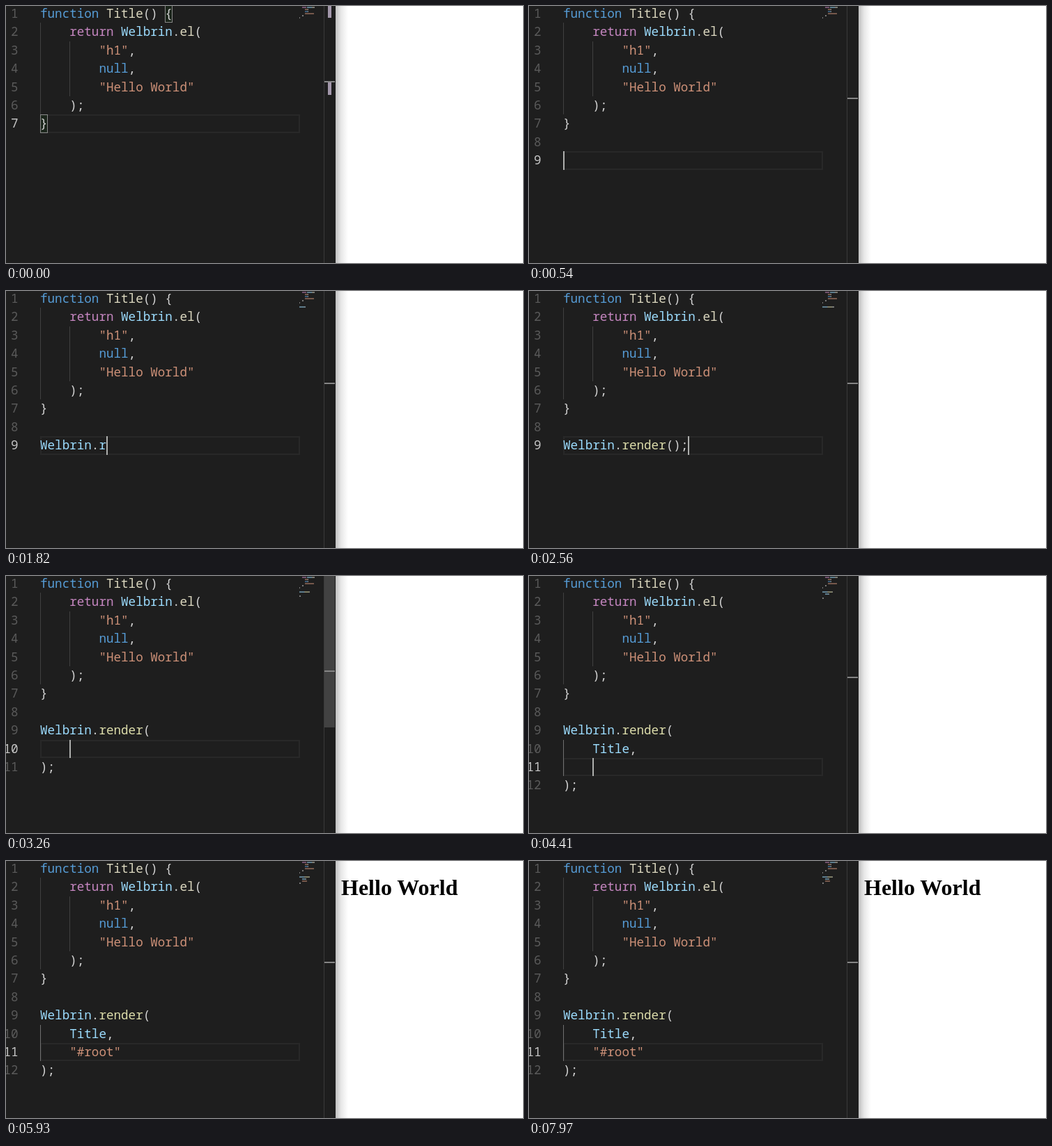
Write an HTML page that moves like this. It is 742x370 px and loops after 8 s.

```html
<!DOCTYPE html>
<html lang="en">
<head>
<meta charset="utf-8">
<title>Code typing</title>
<style>
html, body { margin: 0; width: 100%; height: 100%; overflow: hidden; background: #fff; }
svg { display: block; }
.code { font: 17.58px "Noto Sans Mono", "DejaVu Sans Mono", monospace; }
.page { font: bold 32px "Liberation Serif", "Times New Roman", serif; }
</style>
</head>
<body>
<svg width="742" height="370" viewBox="0 0 742 370">
  <defs>
    <linearGradient id="shade">
      <stop offset="0" stop-opacity=".25"/>
      <stop offset=".45" stop-opacity=".09"/>
      <stop offset="1" stop-opacity="0"/>
    </linearGradient>
  </defs>
  <rect x="473" width="18" height="370" fill="url(#shade)"/>
  <rect width="473" height="370" fill="#1e1e1e"/>
  <g id="editor" class="code"></g>
  <text id="heading" class="page" x="481" y="49">Hello World</text>
</svg>
<script>
const LOOP = 8000, LEFT = 49, CHAR = 10.55, LINE = 26.4, VIEW = 372;
const NAME = 'Welbrin';
const BASE = `function Title() {
    return ${NAME}.el(
        "h1",
        null,
        "Hello World"
    );
}`;
const editorEl = document.getElementById('editor');
const headingEl = document.getElementById('heading');

// Each step is [start time, text after BASE], with | as the caret
const steps = [[0, '|'], [420, '\n|'], [500, '\n\n|']];
function type(head, word, tail, times) {
  times.forEach((t, i) => steps.push([t, head + word.slice(0, i + 1) + '|' + tail]));
}
const call = `\n\n${NAME}.render`;
type('\n\n', NAME, '', [750, 830, 910, 990, 1150, 1230, 1480]);
type('\n\n' + NAME, '.render', '', [1650, 1820, 1900, 1980, 2060, 2100, 2140]);
steps.push(
  [2310, call + '(|)'], [2390, call + '()|'], [2560, call + '();|'],
  [2890, call + '()|;'], [3010, call + '(|);'], [3220, call + '(\n    |\n);']);
type(call + '(\n    ', 'Title,', '\n);', [3710, 3790, 3990, 4070, 4150, 4240]);
const args = call + '(\n    Title,\n    ';
steps.push([4370, args + '|\n);'], [4660, args + '"|"\n);']);
type(args + '"', '#root', '"\n);', [4940, 5100, 5300, 5430, 5590]);

const lineTop = n => Math.floor(LINE * n - 1.6);
const lineHeight = n => lineTop(n + 1) - lineTop(n);
const colX = c => LEFT + c * CHAR;
const rect = (x, y, w, h, fill, more = '') =>
  `<rect x="${x}" y="${y}" width="${w}" height="${h}" fill="${fill}" ${more}/>`;
const text = (x, n, s, fill, more = '') =>
  `<text x="${x}" y="${lineTop(n) + 19}" fill="${fill}" ${more}>${s}</text>`;

function color(token, next, row) {
  if (token[0] === '"') return '#ce9178';
  if (!/\w/.test(token)) return '#d4d4d4';
  if (token === 'return') return '#c586c0';
  if (/^(function|null)$/.test(token)) return '#569cd6';
  if (next === '(') return row < 7 ? '#dcd8c0' : '#dcdcaa';
  return '#9cdcfe';
}

function place(code, i) {
  const before = code.slice(0, i).split('\n');
  return [before.length - 1, before.pop().length];
}

function brackets(code, caret) {
  const close = [caret - 1, caret].find(i => /[})]/.test(code[i] || ''));
  if (close === undefined) return [];
  const open = code.lastIndexOf(code[close] === '}' ? '{' : '(', close);
  return [open, close].map(i => place(code, i));
}

function draw(marked, caretOn, sliderOn) {
  const caret = marked.indexOf('|');
  const code = marked.replace('|', '');
  const lines = code.split('\n');
  const [row, col] = place(code, caret);
  const scale = VIEW / (LINE * (lines.length - 1) + VIEW);
  const rulerY = n => LINE * n * scale - 1.6;
  const pairs = brackets(code, caret);

  // Current line and indent guides
  let out = rect(50, lineTop(row) + 1, 371, lineHeight(row) - 2, 'none',
    'stroke="#282828" stroke-width="2"');
  const guide = (c, from, to, fill) =>
    rect(Math.floor(colX(c)), lineTop(from), 1, lineTop(to) - lineTop(from), fill);
  out += guide(0, 1, 6, '#404040') + guide(4, 2, 5, '#404040');
  if (lines.length > 10 && lines[9].trim())
    out += guide(0, 9, lines.length - 1, '#707070');

  for (const [r, c] of pairs)
    out += rect(Math.floor(colX(c)) + .5, lineTop(r) + .5, 10, lineHeight(r) - 1,
      'rgba(0,100,0,.1)', 'stroke="#888"');

  // Text and its minimap
  lines.forEach((line, n) => {
    out += text(17.5, n, n + 1, n === row ? '#c6c6c6' : '#5a5a5a', 'text-anchor="end"');
    for (const m of line.matchAll(/"[^"]*"?|\w+|[^\s\w"]+/g)) {
      const [token] = m;
      const fill = color(token, line[m.index + token.length], n);
      out += text(colX(m.index), n, token, fill);
      out += rect(421 + m.index, 3 * n - 2, token.length, 2, fill, 'opacity=".5"');
    }
  });

  // Overview ruler
  out += rect(456, 0, 1, 370, '#3a3a3a');
  if (sliderOn) out += rect(457, 0, 15, Math.round(VIEW * scale), '#424242');
  for (const [r] of pairs)
    out += rect(462, Math.round(rulerY(r)), 5, Math.round(LINE * scale), '#a398ab');
  out += rect(457, Math.round(rulerY(row) - 1.5), 15, 2, '#858585');

  if (caretOn) out += rect(Math.round(colX(col)), lineTop(row), 2, lineHeight(row), '#aeafad');
  editorEl.innerHTML = out;
}

let shown = '';
function tick() {
  const t = performance.now() % LOOP;
  const within = (a, b) => t >= a && t < b;
  const marked = BASE + steps.filter(s => s[0] <= t).pop()[1];
  const blinkOff = t >= 5930 && Math.floor((t - 5930) / 340) % 2 === 0;
  const caretOn = !(t < 130 || within(3550, 3710) || blinkOff);
  const sliderOn = within(420, 540) || within(3260, 3990);
  const key = marked + caretOn + sliderOn;
  if (key !== shown) draw(marked, caretOn, sliderOn);
  shown = key;
  headingEl.style.display = t >= 5930 ? '' : 'none';
  requestAnimationFrame(tick);
}
tick();
</script>
</body>
</html>
```
